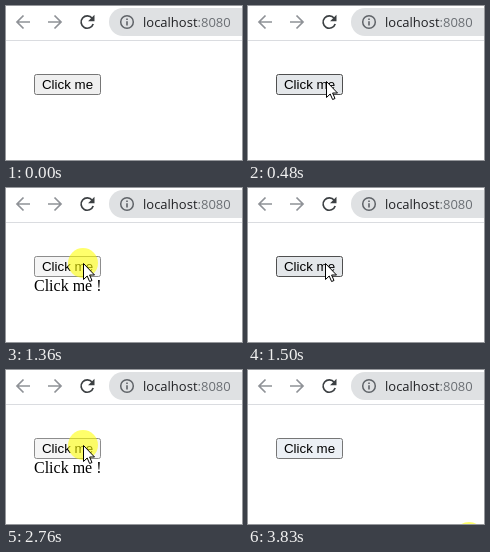
Recreate the animation shown at these times as an HTML page. Size 236 by 154 pixels, loop 3.9 s.

```html
<!DOCTYPE html>
<html lang="en">
<head>
<meta charset="utf-8">
<style>
html, body { margin: 0; width: 100%; height: 100%; overflow: hidden; background: #fff; }
svg { display: block; }
.url { font: 13px "Open Sans", "Noto Sans", sans-serif; fill: #202124; }
.label { font: 13.333px "Liberation Sans", Arial, sans-serif; }
.message { font: 16px "Liberation Serif", "Times New Roman", serif; }
.icon { fill: none; stroke-width: 1.7; }
</style>
</head>
<body>
<svg width="236" height="154" viewBox="0 0 236 154">
  <g class="icon" stroke="#8f9297">
    <path d="M24 16H11.5M17.5 9.5L11 16l6.5 6.5"/>
    <path d="M42 16h12.5M48.500 9.500L55 16l-6.5 6.500"/>
  </g>
  <path class="icon" stroke="#3c4043" stroke-width="2" d="M86.200 12.200A6.200 6.200 0 1 0 87.200 18"/>
  <path fill="#3c4043" d="M88.500 8.800v6.400h-6.400z"/>
  <rect x="103" y="2" width="200" height="28" rx="14" fill="#dfe1e3"/>
  <circle class="icon" cx="121" cy="16" r="6.300" stroke="#5f6368" style="stroke-width:1.5"/>
  <path fill="#5f6368" d="M120.200 12.500h1.600v1.600h-1.600zM120.200 15.200h1.600v4.400h-1.600z"/>
  <text class="url" x="137" y="21">localhost<tspan fill="#6b6f74">:8080</tspan></text>
  <rect y="34" width="236" height="1" fill="#dadce0"/>

  <rect id="button" x="28.500" y="68.500" width="66" height="20" rx="2"/>
  <text class="label" x="61.500" y="83" text-anchor="middle">Click me</text>
  <text class="message" id="message" x="28" y="103">Click me !</text>
  <circle id="halo" r="15" fill="#ff0" fill-opacity=".58"/>
  <path id="cursor" fill="#fff" stroke="#000" d="M.5 .5V16.500L4.200 13L6.600 18.500L9 17.500L6.600 12H11.500Z"/>
</svg>
<script>
const LOOP = 3900;
const [button, message, halo, cursor] =
  ['button', 'message', 'halo', 'cursor'].map(id => document.getElementById(id));
const enter = [70, 130, 200, 270, 340, 410, 480];
const leave = [2890, 2960, 3030, 3100];
const presses = [[610, 680], [1360, 1500], [2030, 2160], [2760, 2890]];
const edge = [188, 140], rest = [77, 75];

const within = (t, [a, b]) => t >= a && t < b;
const show = (el, on) => el.setAttribute('visibility', on ? 'visible' : 'hidden');
const place = (el, [x, y]) => el.setAttribute('transform', `translate(${x} ${y})`);
const mix = (a, b, k) => a.map((v, i) => Math.round(v + (b[i] - v) * k));
const progress = (t, steps) => (steps.filter(s => s <= t).length - 1) / (steps.length - 1);

function pointer(t) {
  if (t < 70 || t >= 3170) return null;
  if (t < 610) return mix(edge, [78, 75], 1 - (1 - progress(t, enter)) ** 2);
  if (t < 2890) return rest;
  return mix(rest, edge, progress(t, leave) ** 1.5);
}

function draw(now) {
  const t = now % LOOP;
  const tip = pointer(t);
  const pressed = presses.some(p => within(t, p));
  const last = t >= 3830;
  const hover = tip && tip[0] < 95 && tip[1] < 89;
  const [fill, stroke] = pressed ? ['#f5f5f5', '#8d8d8d']
    : hover ? ['#e4e7ea', '#4f4f4f']
    : [t < 2890 ? '#efefef' : '#ecf0f5', '#767676'];
  button.setAttribute('fill', fill);
  button.setAttribute('stroke', stroke);
  show(message, within(t, [680, 1500]) || within(t, [2160, 2890]));
  show(halo, pressed || last);
  place(halo, last ? [221, 167] : rest);
  show(cursor, tip);
  if (tip) place(cursor, tip);
}

const start = performance.now();
function tick() {
  draw(performance.now() - start);
  requestAnimationFrame(tick);
}
tick();
</script>
</body>
</html>
```
